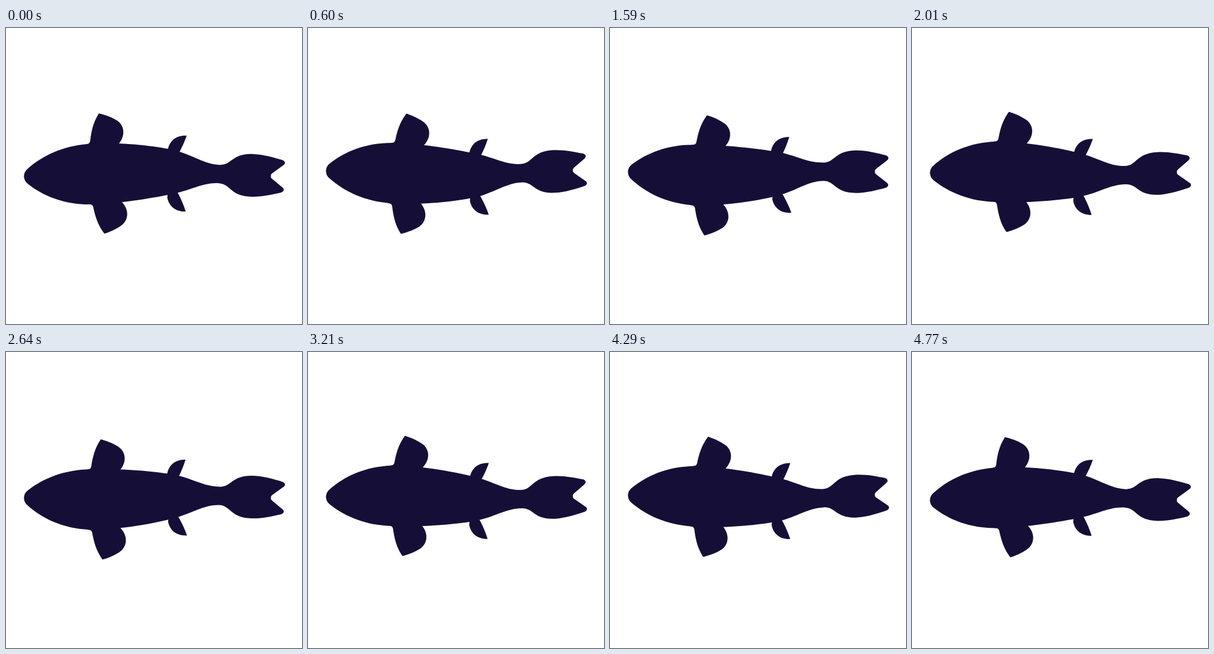
Recreate the animation shown at these times as an HTML page with a canvas. Size 500x500 px, loop 4800 ms.

```html
<!DOCTYPE html>
<html lang="en">
<head>
<meta charset="utf-8">
<title>Swimming fish</title>
<style>
  html, body { margin: 0; width: 100%; height: 100%; overflow: hidden; background: #fff; }
  canvas { display: block; width: 500px; height: 500px; }
</style>
</head>
<body>
<canvas id="stage" width="500" height="500"></canvas>
<script>
const ctx = document.getElementById('stage').getContext('2d');
const PERIOD = 1200, STEP = 30;
const AXIS = 246, AMPLITUDE = 3.3, WAVE = 0.0167, ORIGIN = 160;
const HEAD_X = 100, TAIL_X = 386, TAIL_TILT = -0.012;

// Fins are rigid: they ride the spine at an anchor and turn with part of its slope.
const pectoral = { anchor: 160, sway: 0.85 };
const pelvic = { anchor: 282, sway: 0.5 };

// Outlines of the upper half: x along the spine, y away from it.
const body = [
  'M', 30.5, 1, 'L', 30.5, 0,
  'C', 30.5, -5.5, 32.5, -9, 36.5, -12.5,
  'C', 62, -34, 97, -49.5, 141, -51,
  'C', 192, -52.3, 250, -44, 285, -36.5,
  'C', 315, -29.3, 334, -15.5, 360, -15.5,
  'C', 381, -15.5, 379, -36, 416, -36,
  'C', 434, -36, 452, -31, 465.5, -27.5,
  'C', 470, -26.3, 472, -22, 468, -19,
  'L', 450, -5,
  'C', 448, -3.5, 447.3, -2, 447.3, 0, 'L', 447.3, 1
];
const pectoralFin = [
  'M', 137, -50.8,
  'C', 142, -50.8, 144, -52.5, 144.8, -56,
  'C', 147.5, -72, 151, -86, 160.5, -100,
  'C', 161, -101.3, 162, -101.6, 163.5, -101,
  'C', 174, -98, 185, -93, 192, -88,
  'C', 204, -79, 205, -62, 193, -49,
  'L', 190, -40, 'L', 137, -40
];
const pelvicFin = [
  'M', 274, -28, 'L', 273, -38,
  'C', 275.5, -51, 285, -62, 304.5, -61.5,
  'C', 301, -51, 297, -42, 292.3, -33,
  'L', 287, -24
];

const clamp = (v, lo, hi) => Math.min(hi, Math.max(lo, v));

// Carries a rest point with the spine; head and tail ends stay straight.
function bend(x, y, time, { anchor = clamp(x, HEAD_X, TAIL_X), sway = 1 }) {
  const phase = 2 * Math.PI * time / PERIOD - WAVE * (anchor - ORIGIN);
  const slope = -sway * WAVE * AMPLITUDE * Math.cos(phase);
  const tilt = TAIL_TILT * Math.max(0, x - TAIL_X);
  return [
    x - slope * y,
    AXIS + AMPLITUDE * Math.sin(phase) + slope * (x - anchor) + tilt + y
  ];
}

function fillShape(shape, side, time, joint = {}, shift = 0) {
  const draw = { M: 'moveTo', L: 'lineTo', C: 'bezierCurveTo' };
  ctx.beginPath();
  for (let i = 0; i < shape.length;) {
    const command = shape[i++], points = [];
    while (typeof shape[i] === 'number') {
      points.push(...bend(shape[i], side * (shape[i + 1] - shift), time, joint));
      i += 2;
    }
    ctx[draw[command]](...points);
  }
  ctx.closePath();
  ctx.fill();
}

function render(now) {
  const time = Math.floor(now / STEP) * STEP % PERIOD;
  ctx.fillStyle = '#fff';
  ctx.fillRect(0, 0, 500, 500);
  ctx.fillStyle = '#150f37';
  for (const side of [1, -1]) {
    fillShape(body, side, time);
    fillShape(pectoralFin, side, time, pectoral);
    fillShape(pelvicFin, side, time, pelvic, side < 0 ? 5.2 : 0);
  }
}

let start;
function tick(now) {
  start ??= now;
  render(now - start);
  requestAnimationFrame(tick);
}
render(0);
requestAnimationFrame(tick);
</script>
</body>
</html>
```
